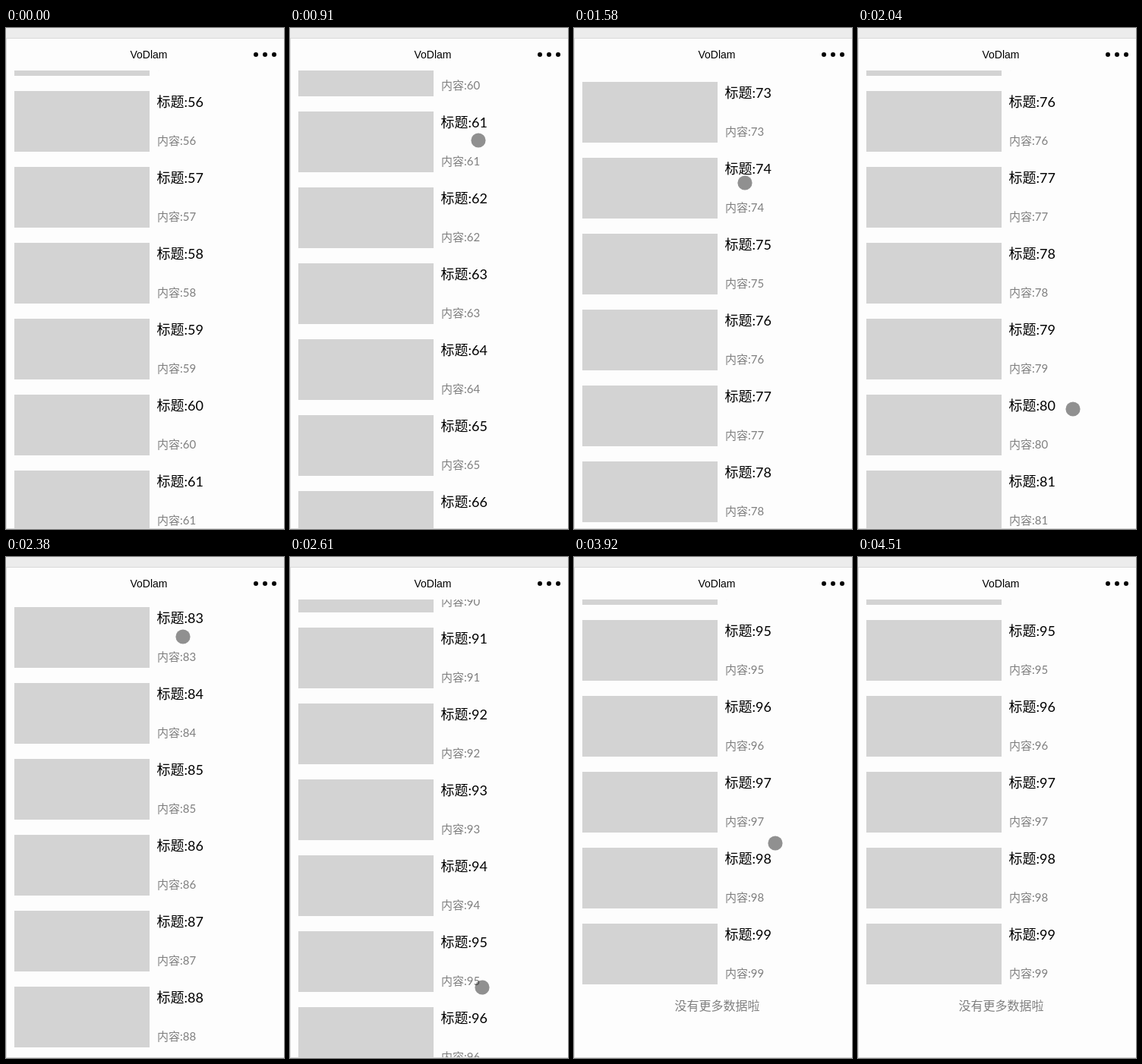
These frames come from a looping animation (366x660 px, 4740 ms). An HTML page:

```html
<!DOCTYPE html>
<html lang="zh-CN">
<head>
<meta charset="utf-8">
<title>Endless list</title>
<style>
  html, body { margin: 0; width: 100%; height: 100%; overflow: hidden; background: #fdfdfd; }
  svg { display: block; }
  text { font-family: Lato, "Noto Sans CJK SC", "Noto Sans CJK", sans-serif; white-space: pre; }
  .thumb { fill: #d3d3d3; }
  .title { font-size: 18px; fill: #000; }
  .note { font-size: 15px; fill: #808080; }
  .footer { font-size: 16px; fill: #808080; text-anchor: middle; }
  .app { font: 14px "Liberation Sans", Arial, sans-serif; text-anchor: middle; }
</style>
</head>
<body>
<svg id="stage" width="366" height="660" viewBox="0 0 366 660">
  <defs><clipPath id="view"><rect x="1" y="56" width="365" height="603"/></clipPath></defs>
  <rect width="366" height="660" fill="#fdfdfd"/>
  <rect width="366" height="13" fill="#ececec"/>
  <rect y="13" width="366" height="1" fill="#d9d9d9"/>
  <rect y="14" width="1" height="646" fill="#dcdcdc"/>
  <rect y="659" width="366" height="1" fill="#d9d9d9"/>
  <text class="app" x="188" y="40">VoDlam</text>
  <circle cx="329" cy="35" r="3"/>
  <circle cx="341" cy="35" r="3"/>
  <circle cx="353" cy="35" r="3"/>
  <g id="list" clip-path="url(#view)"></g>
  <circle id="finger" r="9.6" fill="#000" fill-opacity=".43"/>
</svg>
<script>
const LOOP = 4740, TICK = 56.8, LAST = 99, PITCH = 100;

// [tick, scroll offset]
const scrollKeys = [
  [12, 5517], [14, 5698], [16, 5990], [18, 6200], [24, 6833], [28, 7229], [32, 7517],
  [37, 7517], [39, 7697], [41, 8040], [46, 9007], [49, 9340], [51, 9417]
];

// [tick, x, y]; the finger is hidden outside these spans
const fingerPaths = [
  [[1, 306, 4], [5, 347, 230], [10, 326, 543], [12, 310, 618], [16, 248, 148], [18, 236, 85],
   [24, 285, 598], [28, 225, 204], [30, 215, 100], [36, 283, 502], [37, 288, 520],
   [42, 233, 105], [46, 253, 567], [47, 257, 595], [50, 276, 300], [53, 313, 178]],
  [[69, 265, 377], [75, 358, 640], [76, 380, 700], [78, 369, 666], [79, 385, 690]]
];

// Smooth curve through the keys without overshoot
function curve(keys, col, t) {
  const end = keys.length - 1;
  if (t <= keys[0][0]) return keys[0][col];
  if (t >= keys[end][0]) return keys[end][col];
  const slope = i => (keys[i + 1][col] - keys[i][col]) / (keys[i + 1][0] - keys[i][0]);
  const tangent = i => {
    if (i === 0) return slope(0);
    if (i === end) return slope(end - 1);
    const a = slope(i - 1), b = slope(i);
    return a * b <= 0 ? 0 : 2 * a * b / (a + b);
  };
  const i = keys.findIndex(k => k[0] > t) - 1;
  const [a, b] = [keys[i], keys[i + 1]];
  const h = b[0] - a[0], u = (t - a[0]) / h, v = 1 - u;
  return v * v * (1 + 2 * u) * a[col] + u * u * (3 - 2 * u) * b[col]
    + h * u * v * (v * tangent(i) - u * tangent(i + 1));
}

const list = document.getElementById('list');
const finger = document.getElementById('finger');

function add(parent, tag, attrs = {}) {
  const el = document.createElementNS('http://www.w3.org/2000/svg', tag);
  for (const name in attrs) el.setAttribute(name, attrs[name]);
  return parent.appendChild(el);
}

const rows = Array.from({ length: 7 }, () => {
  const g = add(list, 'g');
  add(g, 'rect', { class: 'thumb', x: 11, width: 178, height: 80 });
  return {
    g,
    title: add(g, 'text', { class: 'title', x: 198.5, y: 21 }),
    note: add(g, 'text', { class: 'note', x: 199, y: 71 })
  };
});
const footer = add(list, 'text', { class: 'footer', x: 188.5 });
footer.textContent = '没有更多数据啦';

function draw(tick) {
  const scroll = Math.round(curve(scrollKeys, 1, tick));
  const first = Math.floor((scroll - 24) / PITCH) + 1;
  rows.forEach((row, i) => {
    const n = first + i;
    row.g.setAttribute('visibility', n > LAST ? 'hidden' : 'visible');
    row.g.setAttribute('transform', `translate(0 ${n * PITCH - scroll})`);
    row.title.textContent = '标题:' + n;
    row.note.textContent = '内容:' + n;
  });
  footer.setAttribute('y', LAST * PITCH - scroll + 114);

  const path = fingerPaths.find(p => tick >= p[0][0] && tick <= p[p.length - 1][0]);
  finger.setAttribute('visibility', path ? 'visible' : 'hidden');
  if (path) {
    finger.setAttribute('cx', curve(path, 1, tick));
    finger.setAttribute('cy', curve(path, 2, tick));
  }
}

const start = performance.now();
let shown = -1;
function frame() {
  const time = (performance.now() - start) % LOOP;
  const tick = Math.floor((time + 14) / TICK);
  if (tick !== shown) draw(shown = tick);
  requestAnimationFrame(frame);
}
frame();
</script>
</body>
</html>
```
